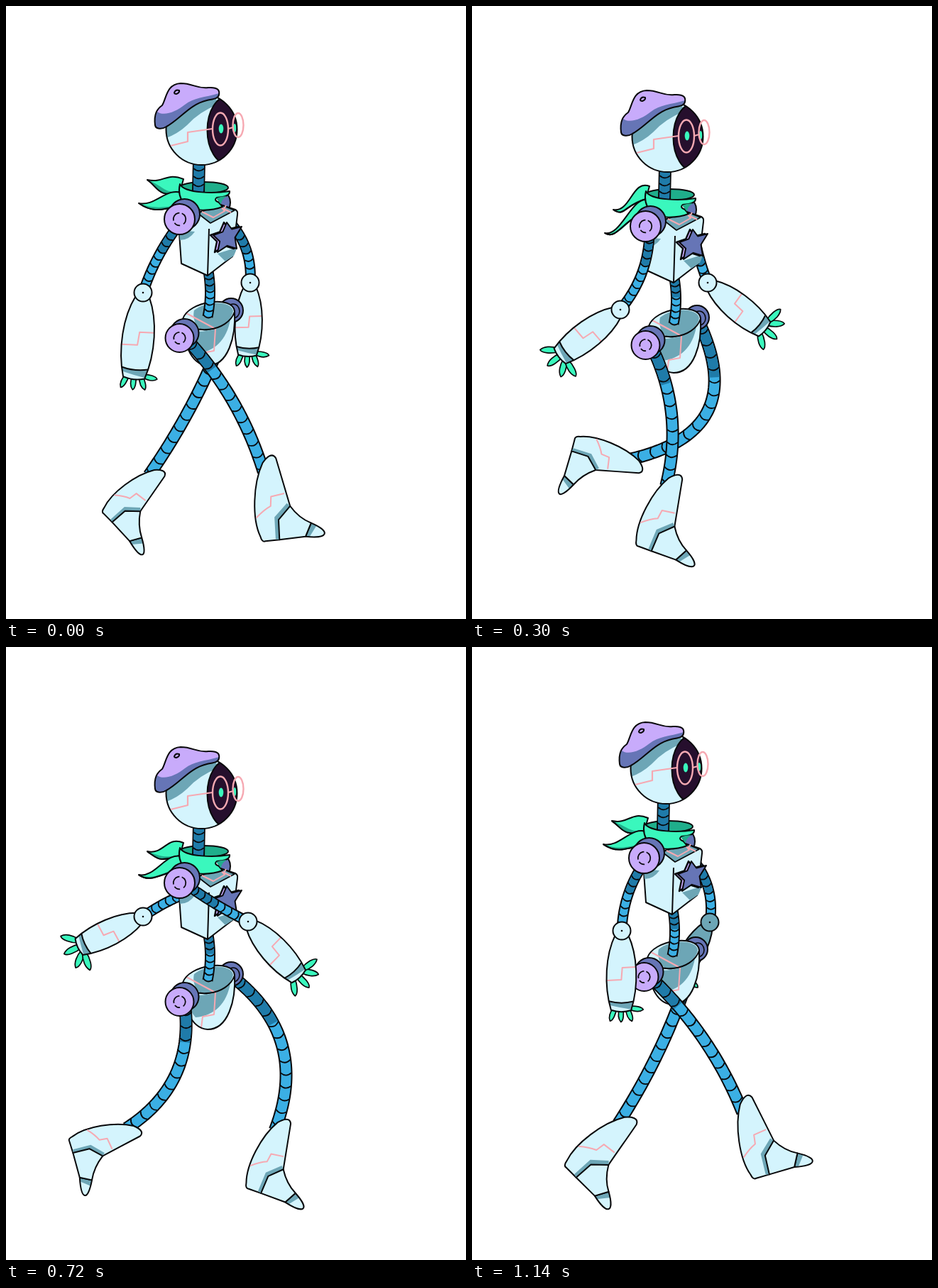
Animation, 648 px wide and 864 px high, one loop 1.2 s. Source, as an HTML page with a canvas:

```html
<!DOCTYPE html>
<html lang="en">
<head>
<meta charset="utf-8">
<title>Walking robot</title>
<style>
html, body { margin: 0; width: 100%; height: 100%; overflow: hidden; background: #fff; }
canvas { display: block; width: 100vw; height: 100vh; }
</style>
</head>
<body>
<canvas width="648" height="864"></canvas>
<script>
const ctx = document.querySelector('canvas').getContext('2d');
const STEP = 60, COUNT = 20, TURN = 2 * Math.PI;
const INK = '#08080a', ICE = '#d4f4fd', TEAL = '#6da6b6', LILAC = '#c8abfb', SLATE = '#6675b6',
  MINT = '#3af7bd', FERN = '#1fae8b', BLUE = '#3bafe4', DEEP = '#1f7ba9', PINK = '#f6a9b2', NIGHT = '#260f2d';

// Key poses: the limbs share KEYS, the body bob has an extra high point per stride
const KEYS = [0, 3, 5, 9, 12, 15, 19];
const body = lane([0, 3, 5, 8, 9, 12, 15, 18, 19],
  [[0, 0], [-2, 30], [0, 10], [-1, -9], [-2, -3], [0, 32], [1, 24], [-1, -9], [-2, -3]]);
// knee, heel, forward bend of the tube
const nearLeg = lane(KEYS, polar([
  [372, 633, 362, 754, 13], [348, 642, 275, 757, 47], [291, 660, 232, 760, 19], [213, 650, 141, 732, -5],
  [191, 682, 89, 694, 32], [271, 678, 180, 667, 31], [386, 632, 397, 749, 13]]));
const farLeg = lane(KEYS, polar([
  [222, 655, 136, 713, 9], [239, 680, 122, 650, 28], [241, 653, 146, 608, 68], [421, 617, 364, 718, 33],
  [396, 665, 339, 762, 42], [358, 657, 313, 752, 20], [230, 664, 131, 731, 10]]));
// elbow, wrist
const nearArm = lane(KEYS, polar([
  [193, 404, 180, 525], [172, 397, 59, 448], [209, 428, 123, 494], [310, 398, 312, 498],
  [341, 387, 413, 465], [297, 440, 362, 522], [211, 400, 210, 513]]));
const farArm = lane(KEYS, polar([
  [344, 390, 340, 493], [382, 376, 461, 448], [332, 390, 413, 456], [218, 385, 212, 473],
  [193, 380, 102, 423], [227, 419, 142, 468], [335, 388, 290, 464]]));

// Turn the second point of each row into angle and distance from the first
function polar(rows) {
  return rows.map(([x, y, x2, y2, ...rest]) =>
    [x, y, (Math.atan2(y2 - y, x2 - x) + TURN) % TURN, Math.hypot(x2 - x, y2 - y), ...rest]);
}

// Smooth periodic interpolation without overshoot
function lane(times, rows) {
  const n = times.length, wrap = k => (k + n) % n;
  const X = k => times[wrap(k)] + COUNT * Math.floor(k / n);
  return s => {
    let i = n - 1;
    while (times[i] > s) i--;
    const h = X(i + 1) - X(i), p = (s - X(i)) / h, q = 1 - p;
    return rows[0].map((_, c) => {
      const Y = k => rows[wrap(k)][c];
      const d = k => (Y(k + 1) - Y(k)) / (X(k + 1) - X(k));
      const m = k => { const a = d(k - 1), b = d(k); return a * b > 0 ? 2 * a * b / (a + b) : 0; };
      return Y(i) * q * q * (1 + 2 * p) + Y(i + 1) * p * p * (1 + 2 * q)
        + h * p * q * (m(i) * q - m(i + 1) * p);
    });
  };
}

const mix = (a, b, t) => [a[0] + (b[0] - a[0]) * t, a[1] + (b[1] - a[1]) * t];
const reach = (o, ang, d) => [o[0] + d * Math.cos(ang), o[1] + d * Math.sin(ang)];

// Local axes: first along o to e, second towards the front, unit = distance
function frame(o, e) {
  const x = e[0] - o[0], y = e[1] - o[1];
  return (a, b) => [o[0] + x * a + y * b, o[1] + y * a - x * b];
}

function paint(path, fill, line = INK, w = 2) {
  if (fill) { ctx.fillStyle = fill; ctx.fill(path); }
  if (line) { ctx.strokeStyle = line; ctx.lineWidth = w; ctx.stroke(path); }
}
const shape = (d, fill, line, w) => paint(new Path2D(d), fill, line, w);
function oval(x, y, rx, ry, fill, line, w) {
  const p = new Path2D();
  p.ellipse(x, y, rx, ry, 0, 0, TURN);
  paint(p, fill, line, w);
}
// Path text from commands and points
const path = (...parts) => parts.map(p => Array.isArray(p) ? p.join(' ') : p).join(' ');
const poly = pts => 'M' + pts.map(p => p.join(' ')).join('L');

// Ribbed tube from a to e, its middle pushed forward by bend
function tube(a, e, bend, w, dark, gap) {
  const ctrl = frame(a, e)(.5, 2 * bend / Math.hypot(e[0] - a[0], e[1] - a[1]));
  const curve = [a], shade = [a], bands = [];
  let len = 0, next = gap;
  for (let i = 1; i <= 48; i++) {
    const t = i / 48, last = curve[i - 1], at = mix(mix(a, ctrl, t), mix(ctrl, e, t), t);
    const d = Math.hypot(at[0] - last[0], at[1] - last[1]);
    curve.push(at);
    len += d;
    if (len < dark) shade.push(at);
    if (len >= next) {
      const o = mix(at, last, (len - next) / d);
      const f = frame(o, [o[0] + (at[0] - last[0]) / d, o[1] + (at[1] - last[1]) / d]), r = w / 2 - .5;
      bands.push(path('M', f(0, -r), 'Q', f(w * .42, 0), f(0, r)));
      next += gap;
    }
  }
  const all = poly(curve);
  shape(all, null, INK, w + 2);
  shape(all, null, BLUE, w - 2);
  shape(poly(shade), null, DEEP, w - 2);
  bands.forEach(b => shape(b, null, INK, 1.8));
}

function boot(K, H, ang) {
  const f = frame(K, H), P = f(.57, .28), I = f(.74, .16), A = f(.97, .19);
  shape(path('M', f(.1, -.08), 'C', f(.03, -.04), f(-.04, .02), f(.03, .07),
    'C', f(.18, .13), f(.42, .22), P, 'L', I, 'L', A, 'L', f(1, .03),
    'Q', f(1.02, -.01), f(.95, -.035), 'C', f(.75, -.15), f(.35, -.17), f(.1, -.08), 'Z'), ICE);
  shape(poly([P, I, A, f(.965, .145), f(.715, .11), f(.54, .24)]) + 'Z', TEAL, null);
  shape(path('M', f(.74, -.1), 'Q', f(.64, -.02), f(.59, .055), 'L', f(.48, .05), 'L', f(.43, .2)), null, PINK, 2);

  // the foot keeps its angle to the shin
  const T = reach(mix(A, P, .5), ang - 1.38, 59), B = mix(A, T, .57), F = mix(P, T, .6), c = mix(B, F, .5);
  const out = (p, k) => { const s = mix(p, c, k * .35); return [s[0] + (T[0] - c[0]) * k, s[1] + (T[1] - c[1]) * k]; };
  const toe = path('M', B, 'C', out(B, 1.28), out(F, 1.28), F, 'Z');
  shape(toe, ICE, null);
  shape(poly([B, F, out(F, .35), out(B, .22)]) + 'Z', TEAL, null);
  shape(toe, null);
  shape(path('M', P, 'L', I, 'L', A, 'L', B, 'L', F, 'Q', mix(mix(P, F, .55), A, .12), P, 'Z'), ICE);
}

function leg([x, y, ang, len, bend], hip, dark) {
  const K = [x, y], H = reach(K, ang, len);
  tube(hip, frame(K, H)(.2, -.06), bend, 16, dark, 18);
  boot(K, H, ang);
}

function arm([x, y, ang, len], shoulder, bend, shaded) {
  const E = [x, y], W = reach(E, ang, len), f = frame(E, W), open = Math.abs(Math.cos(ang));
  tube(shoulder, E, bend, 13, 58, 11);
  // fingers stretch and spread as the arm swings out; the last is the thumb
  for (let i = 0; i < 4; i++) {
    const turn = i < 3 ? (i - 1) * (.35 + .4 * open) : 1.45;
    const base = f(.96, i < 3 ? (i - 1) * .075 : .1), g = frame(base, reach(base, ang - turn, 20 + 7 * open));
    shape(path('M', g(0, -.1), 'C', g(.4, -.22), g(.8, -.2), g(1, 0),
      'C', g(.9, .18), g(.4, .22), g(0, .1), 'Z'), MINT, INK, 1.7);
  }
  const sleeve = path('M', f(.05, -.08), 'C', f(.3, -.2), f(.68, -.22), f(.99, -.125),
    'Q', f(1.03, 0), f(.99, .125), 'C', f(.68, .22), f(.3, .2), f(.05, .08), 'Z');
  shape(sleeve, shaded ? TEAL : ICE, null);
  shape(path('M', f(.89, -.15), 'Q', f(.92, 0), f(.89, .15), 'L', f(.98, .13), 'Q', f(.96, -.01), f(.93, -.14), 'Z'), TEAL, null);
  if (!shaded) shape(poly([f(.62, -.18), f(.61, 0), f(.46, .01), f(.45, .18)]), null, PINK, 2);
  shape(path('M', f(.88, -.155), 'Q', f(.92, 0), f(.88, .155)), null);
  shape(sleeve, null);
  oval(x, y, 12.5, 12.5, shaded ? TEAL : ICE);
  oval(x, y, 1.3, 1.3, INK, null);
}

function joint(x, y, r) {
  oval(x + 7, y - 7, r, r, SLATE);
  oval(x, y, r, r, LILAC);
  for (const [from, to] of [[-1.2, .9], [1.5, 2.5], [2.9, 4.7]]) {
    const p = new Path2D();
    p.arc(x, y, r * .41, from, to);
    paint(p, null, INK, 1.7);
  }
}

function pelvis() {
  oval(317, 429, 17, 17, SLATE);
  oval(320, 430, 9, 10, SLATE, INK, 1.6);
  const bowl = 'M249 441C257 416 319 407 322 430C324 466 313 507 284 507C258 505 249 470 249 441Z';
  shape(bowl, ICE, null);
  shape('M265 429C284 414 318 416 320 430C317 446 301 455 282 458C268 457 262 441 265 429Z', TEAL, null);
  shape('M262 458C280 461 302 456 316 442C311 470 294 488 267 490C258 480 254 465 254 453Z', TEAL, null);
  shape('M254 433L295 455L293 486L277 489L275 505', null, PINK, 2);
  shape('M249 443C262 464 312 460 322 431', null);
  shape(bowl, null);
  tube([285, 374], [284, 438], 3, 13, 28, 9);
}

function torso() {
  oval(308, 277, 8, 13, SLATE);
  shape('M243 306L271 291L302 280L323 287Q327 289 326 294L319 353L284 380L247 363Z', ICE);
  shape('M270 292L302 280L322 288L288 306Z', TEAL, INK, 1.6);
  shape('M276 290L292 298L308 289L303 283M310 281L307 286L317 291', null, PINK, 2);
  shape('M244 316L266 318Q258 330 245 330Z', TEAL, null);
  shape('M298 349L326 340L321 352L309 360Z', TEAL, null);
  shape('M286 314L284 380', null);
  const tips = [[311, 305], [332, 311], [325, 342], [298, 347], [292, 323]], c = [312, 326];
  const star = poly(tips.flatMap((p, i) => [p, mix(c, mix(p, tips[(i + 1) % 5], .5), .64)])) + 'Z';
  ctx.save();
  ctx.translate(-4, 0);
  shape(star, LILAC, INK, 2.4);
  ctx.restore();
  shape(star, SLATE);
}

function tail([x, y], top, low) {
  const back = path('C', [x + 16, y + 11], [214, low + 9], [245, low]);
  shape(path('M', [250, top], 'C', [226, top - 10], [x + 24, y + 5], [x, y], back, 'Z'), MINT);
  shape(path('M', [x, y], back, 'C', [222, low + 2], [x + 24, y + 9], [x, y], 'Z'), FERN, null);
  shape(path('M', [x, y], back), null);
}

function scarf(drop) {
  tail([199, 245 + drop], 244, 262);
  tail([187, 278 + drop], 264, 281);
  oval(279, 256, 34, 8, FERN);
  tube([272, 218], [271, 263], 0, 16, 99, 11);
  shape('M245 251C252 265 296 264 315 261Q316 269 297 270Q292 274 300 277L305 283C290 289 262 290 252 281Q241 267 245 251Z', MINT);
  shape('M296 271Q303 268 311 268Q303 273 303 280Z', FERN, null);
}

function head() {
  const ball = new Path2D();
  ball.arc(275.5, 174, 50, 0, TURN);
  paint(ball, ICE, null);
  ctx.save();
  ctx.clip(ball);
  shape('M220 188Q240 182 255 168Q272 149 300 138L290 122L222 150Z', TEAL, null);
  oval(313, 175, 29.5, 48, NIGHT);
  oval(303, 173, 3.3, 6.5, MINT, null);
  oval(322, 172, 2.4, 6, MINT, null);
  ctx.restore();
  paint(ball, null);
  shape('M232 197L256 191V178L291 173M313 173L320 171', null, PINK, 2.2);
  oval(302, 173.5, 11, 23, null, PINK, 2.4);
  oval(327, 168, 7.5, 17, null, PINK, 2.4);
  const brim = 'C299 131 292 131 283 133C258 139 246 159 226 170C220 174 211 174 210 168';
  const beret = 'M210 168C208 152 213 145 220 140C226 130 226 110 246 109C264 109 268 117 285 115C300 114 301 120 300 125' + brim + 'Z';
  shape(beret, LILAC, null);
  shape('M210 168C209 160 210 154 213 149C222 156 240 149 252 139C264 129 280 129 300 123' + brim + 'Z', SLATE, null);
  shape(beret, null);
  shape('M237 122Q239 117 244 119Q245 122 240 124Q237 124 237 122Z', LILAC);
}

function draw(s) {
  const [dx, dy] = body(s), on = (x, y) => [x + dx, y + dy];
  const wave = (k, lag) => Math.cos(TURN * k * (s + lag) / COUNT);
  const inBody = (...parts) => {
    ctx.save();
    ctx.translate(dx, dy);
    parts.forEach(p => p());
    ctx.restore();
  };
  ctx.fillStyle = '#fff';
  ctx.fillRect(0, 0, 648, 864);
  ctx.lineJoin = 'round';
  arm(farArm(s), on(311, 300), 11 * wave(1, .7), s > 16);
  leg(farLeg(s), on(318, 432), 90);
  inBody(pelvis, torso, () => scarf(16 - 16 * wave(2, 0)), head);
  leg(nearLeg(s), on(251, 466), 62);
  inBody(() => joint(244.5, 468, 20));
  arm(nearArm(s), on(250, 300), -13 * wave(1, 3.6), false);
  inBody(() => joint(244.5, 300.5, 21.5));
}

let shown = -1;
function tick() {
  const s = Math.floor(performance.now() / STEP) % COUNT;
  if (s !== shown) draw(shown = s);
  requestAnimationFrame(tick);
}
tick();
</script>
</body>
</html>
```
